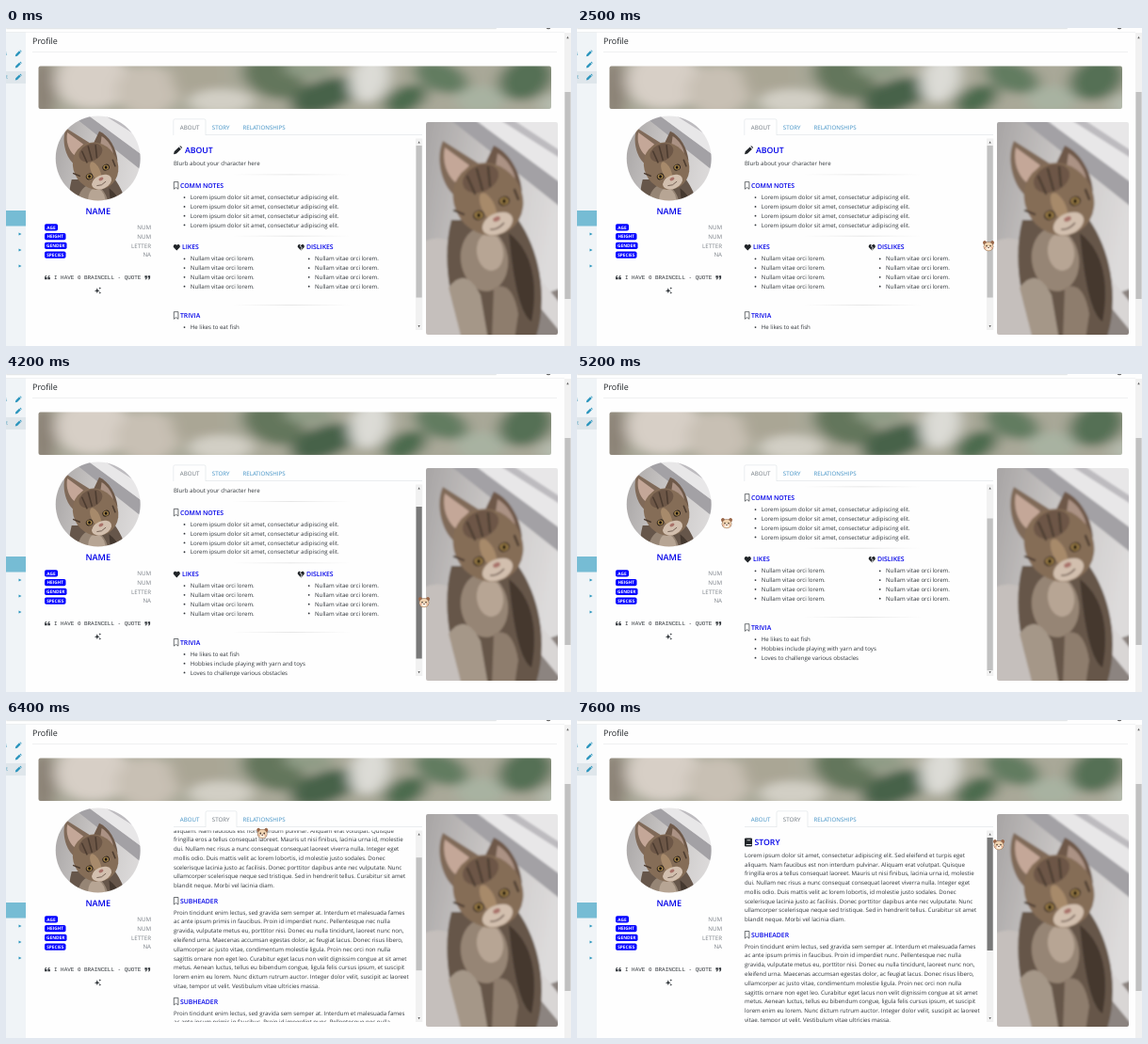
Animation, 600 px wide and 338 px high, one loop 8 s. Source, as an HTML page:

```html
<!DOCTYPE html>
<html lang="en">
<head>
<meta charset="utf-8">
<title>Profile</title>
<style>
  html, body { margin: 0; width: 100%; height: 100%; overflow: hidden; background: #fff; }
  svg { display: block; }
  #stage { width: 100vw; height: 100vh; }
  text { font-family: "Open Sans", sans-serif; text-rendering: geometricPrecision; white-space: pre; }
</style>
</head>
<body>
<svg id="stage" viewBox="0 0 600 338"></svg>
<script>
const BLUE = '#0000e8', INK = '#30353a', LINK = '#3d8fc4';

const text = (x, y, s, size = 6.13, fill = INK, more = '') =>
  `<text x="${x}" y="${y}" font-size="${size}" fill="${fill}" ${more}>${s}</text>`;
const rect = (x, y, w, h, fill, rx = 0) =>
  `<rect x="${x}" y="${y}" width="${w}" height="${h}" fill="${fill}" rx="${rx}"/>`;
const path = (d, fill, more = '') => `<path d="${d}" fill="${fill}" ${more}/>`;
const blob = (x, y, rx, ry, fill, turn = 0) =>
  `<ellipse rx="${rx}" ry="${ry}" fill="${fill}" transform="translate(${x} ${y}) rotate(${turn})"/>`;
const at = (x, y, body, scale = 1) => `<g transform="translate(${x} ${y}) scale(${scale})">${body}</g>`;
const heading = (x, y, s, size = 6.85, more = '') => text(x, y, s, size, BLUE, `font-weight="600" ${more}`);
const lines = (x, y, rows) => rows.map((s, i) => text(x, y + i * 9.78, s)).join('');
const list = (x, y, rows) =>
  lines(x, y, rows) + rows.map((_, i) => blob(x - 6.3, y - 2.1 + i * 9.78, 0.9, 0.9, INK)).join('');
const rule = y => rect(240, y, 126, 0.6, 'url(#fade)');

// Icons
const pencil = (x, y, fill, scale) =>
  at(x, y, path('M0 9 L.7 6 L5.6 1.1 L7.9 3.4 L3 8.3Z M6.3.5 Q7 -.3 7.8.4 L8.7 1.3 Q9.4 2 8.6 2.8Z', fill), scale);
const bookmark = y =>
  path(`M178.3 ${y} h4.6 v7.6 l-2.3 -1.7 l-2.3 1.7Z`, 'none', `stroke="${INK}" stroke-width=".7" stroke-linejoin="round"`);
const heart = (x, y) => at(x, y, path('M3.7 7 L.5 3.7 C-.9 1.6 1.8 -1.1 3.7 1.1 C5.6 -1.1 8.3 1.6 6.9 3.7Z', '#212529'));
const quotes = (x, y, flip) => `<g transform="translate(${x} ${y}) rotate(${flip ? 180 : 0})">` +
  [-2.9, 0.4].map(q => path(`M${q} 2 V-.3 Q${q} -2.2 ${q + 2} -2.2 V-1.2 Q${q + 1} -1.2 ${q + 1} -.2 H${q + 2.4} V2Z`, INK)).join('') + '</g>';
const spark = (x, y, r) => path(`M${x} ${y - r} L${x + r * .28} ${y - r * .28} L${x + r} ${y} L${x + r * .28} ${y + r * .28}
  L${x} ${y + r} L${x - r * .28} ${y + r * .28} L${x - r} ${y} L${x - r * .28} ${y - r * .28}Z`, INK);
const arrow = (x, y, dx, dy, fill) =>
  path(`M${x + dx} ${y + dy} L${x - dx - dy} ${y - dy + dx} L${x - dx + dy} ${y - dy - dx}Z`, fill);

// Pictures
const eye = (x, y) => blob(x, y, 6, 5, '#2c231d', -25) + blob(x, y, 4.5, 4, '#a48449') + blob(x, y, 2.2, 2.6, '#17120f');
const stripe = d => path(d, 'none', 'stroke="#4c3c30" stroke-width="2.4" stroke-linecap="round"');
const kitten = `<g filter="url(#soft)">` +
  rect(-5, -5, 150, 236, 'url(#wall)') +
  path('M24 -4 L145 92 V66 L50 -4Z', '#a3a1a5') + path('M50 -4 L145 66 V-4Z', '#e8e7e8') +
  path('M76 -4 L145 40 V32 L90 -4Z', '#bdbbbf') +
  path('M-5 128 Q14 118 32 130 L46 231 H-5Z', '#c5bfbc') +
  path('M104 190 L145 176 V231 H92Z', '#8c8480') + path('M108 150 L145 196 V226 L112 186Z', '#d9d6d5') +
  path('M27 104 C16 146 26 196 42 231 H116 C130 190 122 138 98 104Z', '#66564a') +
  path('M88 118 C112 136 120 170 112 212 C98 202 92 160 88 118Z', '#44382f') +
  blob(62, 146, 25, 34, '#968575', -8) + blob(68, 138, 14, 20, '#b7a594', -8) +
  path('M24 176 Q42 152 58 184 L66 231 H38Z', '#a59788') + path('M72 176 Q92 168 98 204 L94 231 H70Z', '#8e7d6d') +
  path('M18 20 C10 38 16 66 30 78 L56 44Z', '#806a59') + path('M20 27 C17 42 22 56 31 64 L46 46Z', '#c4a798') +
  path('M72 25 C88 32 100 52 102 74 L62 46Z', '#6e5949') + path('M76 33 C87 40 94 52 95 62 L74 47Z', '#ab9284') +
  blob(66, 82, 40, 36, '#856d57', 55) + blob(58, 60, 20, 14, '#6d5747', -25) +
  stripe('M44 58 L52 76') + stripe('M54 50 L60 72') + stripe('M66 48 L68 68') + stripe('M30 94 L40 98') + stripe('M94 72 L98 82') +
  blob(66, 90, 7, 16, '#a78a6b', -25) + blob(76, 108, 17, 11, '#d2bfae', -25) +
  eye(56, 99) + eye(83, 84) + blob(75, 103, 4, 2.6, '#a9736a', -25) +
  path('M68 114 Q76 115 83 107', 'none', 'stroke="#5d4a40" stroke-width="1.2"') + '</g>';

const banner = `<g filter="url(#blur)">` + rect(20, 30, 580, 70, '#a9a898') +
  blob(38, 66, 16, 32, '#8b8276') + blob(92, 56, 40, 30, '#d7cfc6') + blob(150, 66, 34, 26, '#c8c0b4') +
  blob(204, 52, 28, 26, '#aaa695') + blob(228, 78, 34, 13, '#d2cfc5') + blob(284, 52, 34, 22, '#64765c', 18) +
  blob(338, 72, 38, 17, '#47624a', -18) + blob(322, 44, 26, 9, '#8f9c86') + blob(386, 54, 20, 26, '#dcdbd6', 24) +
  blob(424, 76, 24, 14, '#4c6a4e', -24) + blob(462, 52, 30, 16, '#627c61', 18) + blob(504, 76, 26, 14, '#a8b2a1') +
  blob(552, 54, 30, 22, '#547054', -20) + blob(585, 82, 18, 12, '#b5bbae') + '</g>';

const face = blob(-3.9, -3.6, 2, 2.4, '#9a6748', -25) + blob(3.9, -3.6, 2, 2.4, '#9a6748', 25) +
  blob(0, 0.2, 5.3, 5, '#8f6a52') + blob(0, 0.2, 4.8, 4.5, '#f0d3b0') + blob(0, 2, 2.5, 1.9, '#fff3e4') +
  blob(-2, -0.4, 0.7, 0.9, '#2e211b') + blob(2, -0.4, 0.7, 0.9, '#2e211b') + blob(0, 1.3, 0.9, 0.6, '#5a3a2e') +
  blob(-3.2, 1.6, 0.9, 0.6, '#eda594') + blob(3.2, 1.6, 0.9, 0.6, '#eda594');

// Tab panes
const vitae = Array(4).fill('Nullam vitae orci lorem.');
const about = pencil(178, 125.3, '#212529', 1) + heading(190, 133.3, 'ABOUT', 8.7) +
  text(178, 145.8, 'Blurb about your character here') + rule(155.6) +
  bookmark(163.6) + heading(185, 170, 'COMM NOTES') +
  list(195.8, 182.2, Array(4).fill('Lorem ipsum dolor sit amet, consectetur adipiscing elit.')) + rule(220.8) +
  heart(177.6, 229.6) + heading(187, 235.4, 'LIKES') + list(195.8, 247.4, vitae) +
  heart(309.6, 229.6) + path('M313.6 229.6 l-1.3 2.4 l2 1.2 l-1.3 3', 'none', 'stroke="#fff" stroke-width=".8"') +
  heading(319, 235.4, 'DISLIKES') + list(328, 247.4, vitae) + rule(294.4) +
  bookmark(301.7) + heading(185, 308.1, 'TRIVIA') +
  list(195.8, 320.2, ['He likes to eat fish', 'Hobbies include playing with yarn and toys', 'Loves to challenge various obstacles']);

const intro = `Lorem ipsum dolor sit amet, consectetur adipiscing elit. Sed eleifend et turpis eget
aliquam. Nam faucibus est non interdum pulvinar. Aliquam erat volutpat. Quisque
fringilla eros a tellus consequat laoreet. Mauris ut nisi finibus, lacinia urna id, molestie
dui. Nullam nec risus a nunc consequat consequat laoreet viverra nulla. Integer eget
mollis odio. Duis mattis velit ac lorem lobortis, id molestie justo sodales. Donec
scelerisque lacinia justo ac facilisis. Donec porttitor dapibus ante nec vulputate. Nunc
ullamcorper scelerisque neque sed tristique. Sed in hendrerit tellus. Curabitur sit amet
blandit neque. Morbi vel lacinia diam.`.split('\n');
const chapter = `Proin tincidunt enim lectus, sed gravida sem semper at. Interdum et malesuada fames
ac ante ipsum primis in faucibus. Proin id imperdiet nunc. Pellentesque nec nulla
gravida, vulputate metus eu, porttitor nisi. Donec eu nulla tincidunt, laoreet nunc non,
eleifend urna. Maecenas accumsan egestas dolor, ac feugiat lacus. Donec risus libero,
ullamcorper ac justo vitae, condimentum molestie ligula. Proin nec orci non nulla
sagittis ornare non eget leo. Curabitur eget lacus non velit dignissim congue at sit amet
metus. Aenean luctus, tellus eu bibendum congue, ligula felis cursus ipsum, et suscipit
lorem enim eu lorem. Nunc dictum rutrum auctor. Integer dolor velit, suscipit ac laoreet
vitae, tempor ut velit. Vestibulum vitae ultricies massa.`.split('\n');
const section = y => bookmark(y - 6.4) + heading(185, y, 'SUBHEADER') + lines(178, y + 11.8, chapter);
const story = rect(178, 125.4, 8, 9, '#212529', 1.2) + rect(179.6, 132, 5.8, 0.9, '#fff') + rect(180.6, 127.4, 3.6, 0.8, '#fff') +
  heading(188.5, 133.3, 'STORY', 8.7) + lines(178, 145.8, intro) + section(230.9) + section(337.7);

const facts = [['AGE', 14, 'NUM'], ['HEIGHT', 22.5, 'NUM'], ['GENDER', 23.5, 'LETTER'], ['SPECIES', 22.5, 'NA']]
  .map(([label, w, value], i) => {
    const y = 208.2 + i * 9.75;
    return rect(41, y, w, 7.4, '#00f', 1.8) +
      text(41 + w / 2, y + 5.5, label, 4.75, '#fff', 'font-weight="700" text-anchor="middle"') +
      text(154, y + 6, value, 6.2, '#7b8188', 'text-anchor="end"');
  }).join('');

const stops = (...list) => list.map(([o, c, a = 1]) => `<stop offset="${o}" stop-color="${c}" stop-opacity="${a}"/>`).join('');
const stage = document.getElementById('stage');
stage.innerHTML = `<defs>
  <linearGradient id="fade">${stops([0, '#ccc', 0], [.5, '#ccc', .8], [1, '#ccc', 0])}</linearGradient>
  <linearGradient id="wall" x2="1" y2=".3">${stops([0, '#a5a2a2'], [.45, '#c6c3c2'], [1, '#dddbdb'])}</linearGradient>
  <filter id="soft"><feGaussianBlur stdDeviation="1"/></filter>
  <filter id="blur"><feGaussianBlur stdDeviation="8 5"/></filter>
  <clipPath id="bannerBox">${rect(34.5, 40.5, 544.5, 45.5, '#000', 2)}</clipPath>
  <clipPath id="photoBox">${rect(0, 0, 140, 226, '#000', 2)}</clipPath>
  <clipPath id="avatarBox"><circle cx="70" cy="69.2" r="69.2"/></clipPath>
  <clipPath id="paneBox">${rect(176, 117.5, 258, 203.5, '#000')}</clipPath>
</defs>` +
  rect(0, 0, 600, 338, '#fefefe') + rect(0, 4, 21, 334, '#f0f4f7') + rect(0, 0, 521, 1.2, '#e3e6e8', 1) +
  blob(576, 0, 2.2, 1.2, '#666') + rect(0, 4, 593, 0.6, '#ebedef') +
  rect(0, 46, 21, 13, '#dfe6eb') + rect(0, 194, 21, 16.5, '#76bcd4') +
  [23.4, 35.8, 48.8].map(y => pencil(9.8, y, '#2b95bd', 0.75)).join('') +
  text(-1.5, 29, 's', 6, '#5aa5c0') + text(0, 54.4, 't', 6, '#5aa5c0') +
  [219, 236, 253].map(y => arrow(15, y, 1.5, 0, '#2b95bd')).join('') +
  rect(593, 5, 7, 333, '#f1f1f1') + rect(593.4, 68, 6.2, 220, '#c1c1c1') + arrow(596.5, 10, 0, -1.2, '#666') +
  text(28, 17.2, 'Profile', 8.95, '#212529', 'font-weight="500"') + rect(28, 25, 557, 0.6, '#e6e8ea') +
  `<g clip-path="url(#bannerBox)">${banner}</g>` +
  at(446, 100, `<g clip-path="url(#photoBox)">${kitten}</g>`) +
  at(52.2, 93.5, `<g clip-path="url(#avatarBox)">${kitten}</g>`, 0.65) +
  heading(97.7, 197.8, 'NAME', 9.1, 'text-anchor="middle"') + facts +
  quotes(44, 265.3) + quotes(150.2, 265.3, true) +
  text(51, 267.3, 'I HAVE 0 BRAINCELL - QUOTE', 5.93, INK, `style="font-family:'Liberation Mono',monospace"`) +
  spark(96.8, 279.2, 2.9) + spark(99.8, 276.6, 1.4) + spark(99.8, 281.4, 1.4) +
  rect(178, 113.3, 264, 0.6, '#dee2e6') + '<path id="tab" fill="#fefefe" stroke="#dee2e6" stroke-width=".6"/>' +
  [['ABOUT', 184.8], ['STORY', 218.8], ['RELATIONSHIPS', 251.5]].map(([s, x]) => text(x, 107.5, s, 6.15, LINK, 'class="tab"')).join('') +
  `<g clip-path="url(#paneBox)"><g id="about">${about}</g><g id="story">${story}</g></g>` +
  rect(435, 117.5, 7.2, 203.5, '#f1f1f1') + arrow(438.6, 121.3, 0, -1.1, '#555') + arrow(438.6, 317.2, 0, 1.1, '#555') +
  rect(435.5, 125, 6.2, 0, '#c1c1c1').replace('<rect', '<rect id="thumb"') + `<g id="cursor">${face}</g>`;

const $ = id => document.getElementById(id);
const clamp = (v, lo, hi) => Math.min(hi, Math.max(lo, v));

// Pointer way points: time, x, y
const way = [[1500, 402, 348], [1900, 380, 296], [2400, 436, 234], [2500, 437, 232], [2800, 439, 227], [4200, 444, 243],
  [4500, 444, 257], [4700, 425, 245], [5200, 159, 159], [5800, 230, 107], [6200, 230, 107], [6900, 443, 177],
  [7100, 443, 174], [7600, 448, 133]];
function pointer(t) {
  const i = way.findIndex(p => p[0] > t);
  if (i < 0) return way[way.length - 1].slice(1);
  if (i === 0) return [-50, -50];
  const [a, b] = [way[i - 1], way[i]], k = (t - a[0]) / (b[0] - a[0]), e = k * k * (3 - 2 * k);
  return [a[1] + (b[1] - a[1]) * e, a[2] + (b[2] - a[2]) * e];
}

const TRACK = 190, VIEW = 204;
function draw(t) {
  const [x, y] = pointer(t), onStory = t >= 6000, storyPane = t >= 6100;
  const height = storyPane ? 323 : 240, ratio = TRACK / height;
  let scroll = 36;
  if (t < 4500) scroll = t < 2800 ? 0 : clamp((y - 227) / ratio, 0, 36);
  else if (t >= 7100) scroll = clamp(36 + (y - 174) / ratio, 0, 36);
  const dragging = (t >= 2800 && t < 4600) || t >= 7000;

  $('cursor').setAttribute('transform', `translate(${x} ${y})`);
  for (const id of ['about', 'story']) $(id).setAttribute('transform', `translate(0 ${-scroll})`);
  $('about').setAttribute('opacity', onStory ? (storyPane ? 0 : 0.35) : 1);
  $('story').setAttribute('opacity', storyPane ? clamp(0.06 + (t - 6100) / 150, 0, 1) : 0);
  $('thumb').setAttribute('y', 125 + scroll * ratio);
  $('thumb').setAttribute('height', VIEW * ratio);
  $('thumb').setAttribute('fill', dragging ? '#787878' : '#c1c1c1');
  const [left, right] = onStory ? [212, 245] : [177.8, 212];
  $('tab').setAttribute('d', `M${left} 114 V98.5 Q${left} 96.8 ${left + 1.7} 96.8 H${right - 1.7} Q${right} 96.8 ${right} 98.5 V114`);
  document.querySelectorAll('.tab').forEach((el, i) => el.setAttribute('fill', i === +onStory ? '#6c757d' : LINK));
}

function frame(now) {
  draw(Math.floor(now % 8000 / 100) * 100);
  requestAnimationFrame(frame);
}
draw(0);
requestAnimationFrame(frame);
</script>
</body>
</html>
```
